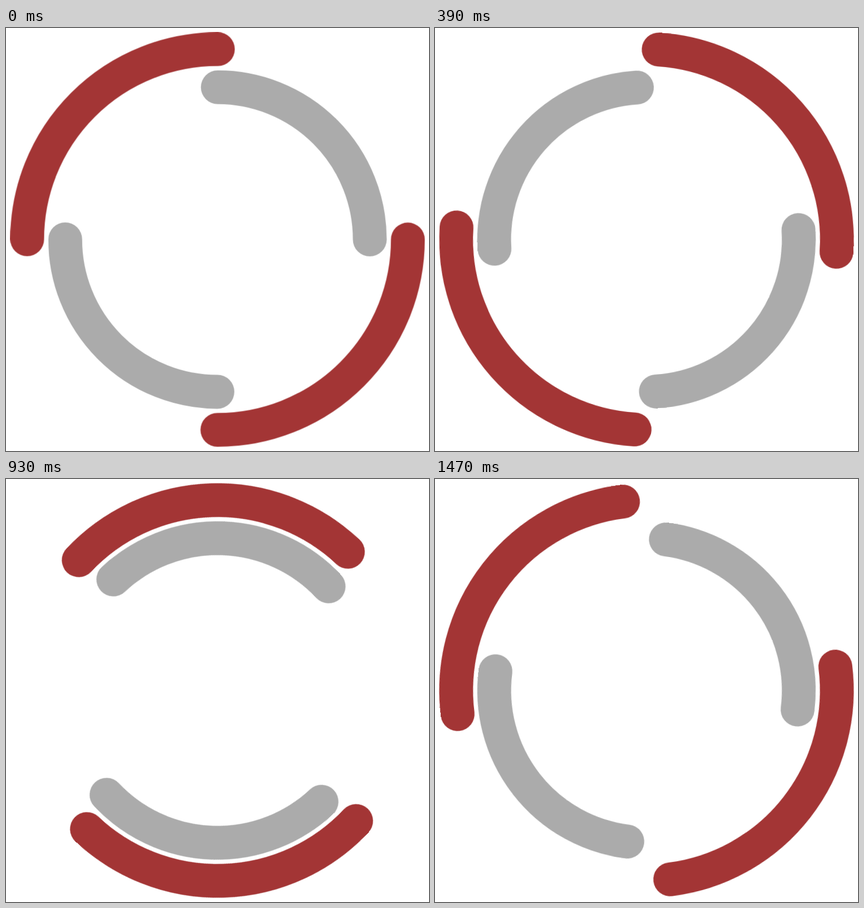
Animation, 748 px wide and 748 px high, one loop 1.5 s. Source, as an HTML page:

```html
<!DOCTYPE html>
<html lang="en">
<head>
<meta charset="utf-8">
<title>Double ring spinner</title>
<style>
  html, body { margin: 0; width: 100%; height: 100%; overflow: hidden; background: #fff; }
  svg { display: block; width: 100vw; height: 100vh; }
  circle {
    fill: none;
    stroke-width: 8;
    stroke-linecap: round;
    transform-origin: 50px 50px;
  }
</style>
</head>
<body>
<svg viewBox="0 0 100 100">
  <circle id="outer" cx="50" cy="50" r="45" stroke="#a33535"/>
  <circle id="inner" cx="50" cy="50" r="36" stroke="#ababab"/>
</svg>
<script>
  const LOOP = 1500;
  const STEPS = 50;

  // Two quarter arcs on opposite sides, turning one full circle per loop.
  function spin(id, turn, shifted) {
    const ring = document.getElementById(id);
    const quarter = ring.r.baseVal.value * Math.PI / 2;
    ring.style.strokeDasharray = `${quarter} ${quarter}`;
    ring.style.strokeDashoffset = shifted ? quarter : 0;
    ring.animate(
      { transform: ['rotate(0deg)', `rotate(${turn}deg)`] },
      // The small negative delay keeps step edges clear of rounding.
      { duration: LOOP, delay: -1, iterations: Infinity, easing: `steps(${STEPS}, end)` }
    );
  }

  spin('outer', 360, false);
  spin('inner', -360, true);
</script>
</body>
</html>
```
